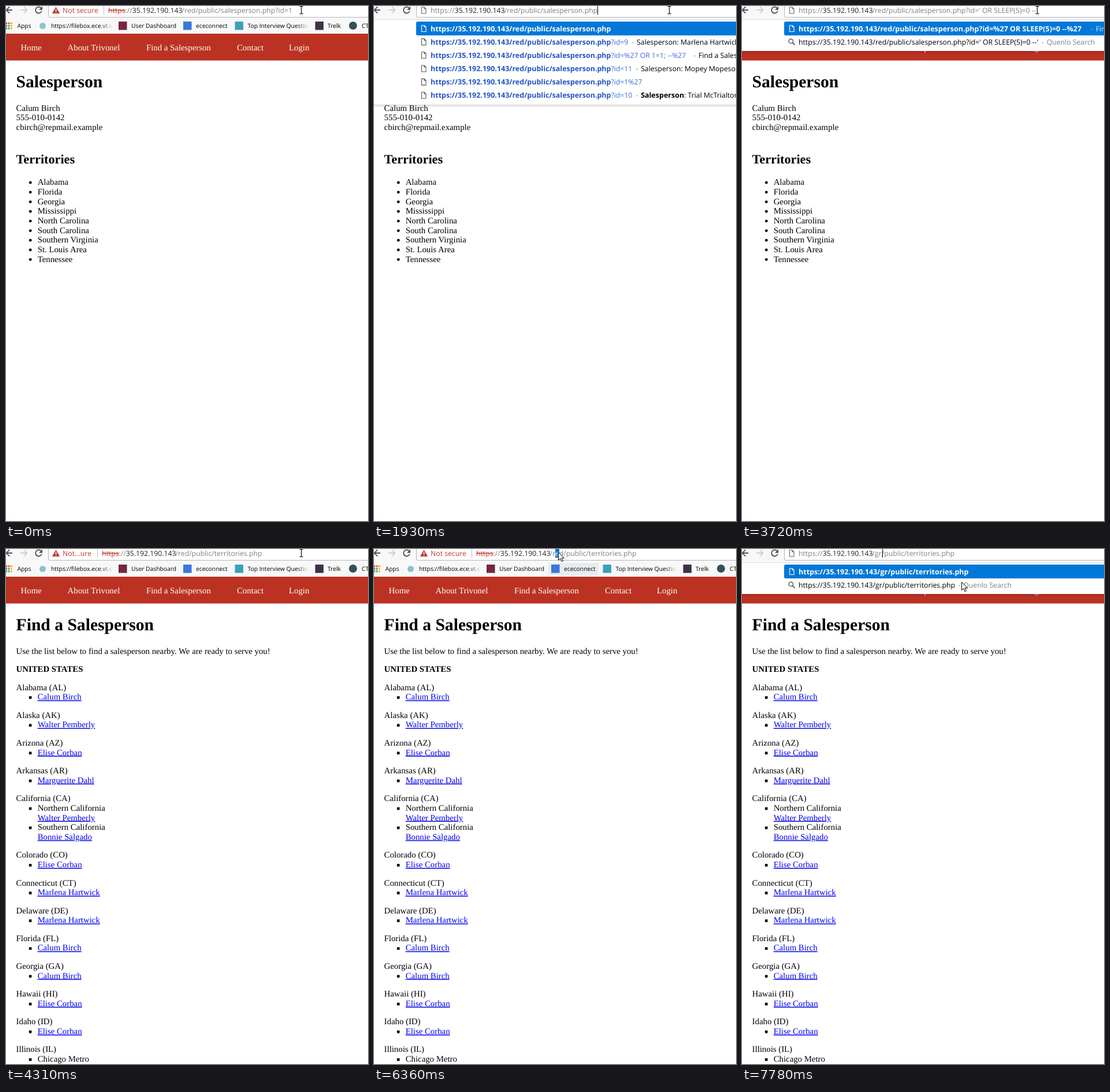
Animation of 627x893 px, one loop 8000 ms. Source, as an HTML page:

```html
<!DOCTYPE html>
<html lang="en">
<head>
<meta charset="utf-8">
<title>Browser session</title>
<style>
html, body { margin: 0; width: 627px; height: 893px; overflow: hidden; background: #fff; }
svg { display: block; }
text { white-space: pre; text-rendering: geometricPrecision; }
.page { font: 14.8px "Liberation Serif", serif; }
.ui { font: 12.25px "Open Sans", "Noto Sans", sans-serif; }
.mark { font: 10.3px "Open Sans", "Noto Sans", sans-serif; }
.b { font-weight: 700; font-size: 12.5px; }
.strong { font-weight: 700; }
.link { fill: #00e; text-decoration: underline; }
</style>
</head>
<body>
<svg id="stage" width="627" height="893" viewBox="0 0 627 893"></svg>
<script>
const stage = document.getElementById('stage');
const LOOP = 8000, LINE = 16.67, GAP = 31.48;
const BAR = '#f8f8f8', RED = '#bb3223', BLUE = '#0078d7', GREY = '#808080';
const HOST = '35.192.190.143';
const SALES = '/red/public/salesperson.php';
const SLEEP = "?id=' OR SLEEP(5)=0 --'";

const text = (x, y, s, cls = 'page', extra = '') =>
  `<text x="${x}" y="${y}" class="${cls}" ${extra}>${s}</text>`;
const rect = (x, y, w, h, fill, extra = '') =>
  `<rect x="${x}" y="${y}" width="${w}" height="${h}" fill="${fill}" ${extra}/>`;
const path = (d, stroke, w = 1, fill = 'none') =>
  `<path d="${d}" stroke="${stroke}" stroke-width="${w}" fill="${fill}"/>`;
const span = (s, fill, extra = '') => `<tspan fill="${fill}" ${extra}>${s}</tspan>`;
const heading = (y, s, size) => text(17.6, y, s, 'page strong', `style="font-size:${size}px"`);

const defs = `<defs>
  <linearGradient id="fade"><stop stop-color="${BAR}" stop-opacity="0"/><stop offset="1" stop-color="${BAR}"/></linearGradient>
  <linearGradient id="shade" x2="0" y2="1"><stop stop-opacity=".16"/><stop offset="1" stop-opacity="0"/></linearGradient>
</defs>`;

// Page content
const REP = { a: 'Calum Birch', b: 'Walter Pemberly', c: 'Elise Corban', d: 'Marguerite Dahl', e: 'Bonnie Salgado', f: 'Marlena Hartwick' };
const AREAS = ['Alabama', 'Florida', 'Georgia', 'Mississippi', 'North Carolina', 'South Carolina',
  'Southern Virginia', 'St. Louis Area', 'Tennessee'];
const STATES = [['Alabama (AL)', 'a'], ['Alaska (AK)', 'b'], ['Arizona (AZ)', 'c'], ['Arkansas (AR)', 'd'],
  ['California (CA)', '*Northern California', 'b', '*Southern California', 'e'],
  ['Colorado (CO)', 'c'], ['Connecticut (CT)', 'f'], ['Delaware (DE)', 'f'], ['Florida (FL)', 'a'],
  ['Georgia (GA)', 'a'], ['Hawaii (HI)', 'c'], ['Idaho (ID)', 'c'], ['Illinois (IL)', '*Chicago Metro']];

function salesPage() {
  const info = [REP.a, '555-010-0142', 'cbirch@repmail.example'];
  return heading(141, 'Salesperson', 29.6) +
    info.map((s, i) => text(17.6, 181.7 + i * LINE, s)).join('') +
    heading(273.4, 'Territories', 22.2) +
    AREAS.map((s, i) => {
      const y = 310.2 + i * LINE;
      return `<circle cx="42.2" cy="${y - 4}" r="2.4"/>` + text(54.7, y, s);
    }).join('');
}

function listPage() {
  let out = heading(141, 'Find a Salesperson', 29.6) +
    text(17.6, 181.7, 'Use the list below to find a salesperson nearby. We are ready to serve you!') +
    heading(213.1, 'UNITED STATES', 14.8);
  let y = 244.6;
  for (const [name, ...items] of STATES) {
    out += text(17.6, y, name);
    items.forEach((it, i) => {
      y += LINE;
      const plain = it[0] === '*';
      if (plain || i === 0) out += rect(39.8, y - 6, 4.6, 4.6, '#000');
      out += plain ? text(54.7, y, it.slice(1)) : text(54.7, y, REP[it], 'page link');
    });
    y += GAP;
  }
  return out;
}

const NAV = rect(0, 48, 627, 46.5, RED) +
  [[25.6, 'Home'], [106.6, 'About Trivonel'], [243, 'Find a Salesperson'], [400, 'Contact'], [490, 'Login']]
    .map(([x, s]) => text(x, 77, s, 'page', 'fill="#fff"')).join('');

// Browser chrome
function bookmarks(hover) {
  const dots = ['#ea4335', '#ea4335', '#f4a024', '#34a853', '#4285f4', '#fbbc05', '#34a853', '#34a853', '#fbbc05']
    .map((c, i) => rect(-1 + i % 3 * 4.4, 28.5 + Math.floor(i / 3) * 4.4, 3, 3, c)).join('');
  const icons = [[195, '#742545'], [307, '#3b78d8'], [396.5, '#3da0bb'], [535.5, '#40304a']]
    .map(([x, c]) => rect(x, 27, 14.5, 14.5, c)).join('');
  const labels = [[19.5, 'Apps'], [78, 'https://filebox.ece.vt.e'], [217, 'User Dashboard'], [329, 'ececonnect'],
    [418.5, 'Top Interview Questio'], [557, 'Trelk'], [616, 'CT']]
    .map(([x, s]) => text(x, 38, s, 'mark')).join('');
  return rect(0, 22, 627, 26, BAR) + (hover ? rect(302, 22.5, 87, 23, '#e9ebf0', 'rx="2"') : '') +
    dots + icons + '<circle cx="63.5" cy="34.5" r="5.5" fill="#8cc3cc"/><circle cx="601" cy="34" r="7" fill="#35505c"/>' +
    labels + rect(164, 25, 21, 20, 'url(#fade)') + rect(504, 25, 21, 20, 'url(#fade)') + rect(185, 25, 8, 20, BAR);
}

const fileIcon = (y, c) => path(`M82.5 ${y - 5.5}h4.5l3 3v8h-7.5zM87 ${y - 5.5}v3h3`, c, 1.1);
const lensIcon = y => `<circle cx="84.8" cy="${y - 1.2}" r="3.7" fill="none" stroke="#555" stroke-width="1.4"/>` +
  path(`M87.5 ${y + 1.5}l4 4`, '#555', 1.8);

const TOOLS = rect(0, 0, 627, 24, BAR) +
  path('M11 7H1M6 1.5L.5 7L6 12.5', '#555', 1.8) +
  path('M25 7H36M31 1.5L36.5 7L31 12.5', '#cfcfcf', 1.8) +
  path('M61 3.9A5.4 5.4 0 1 0 61.7 8.7', '#505050', 1.9) +
  '<path d="M63 .8v6h-6z" fill="#505050"/>' +
  rect(73.5, -8, 570, 27.5, '#fff', 'rx="2.5" stroke="#b4b4b4"');

const WARNING = '<path d="M86.5 1.5L93.2 13H79.8z" fill="#c5392a"/>' + rect(85.8, 5.2, 1.5, 4, '#fff') + rect(85.8, 10.2, 1.5, 1.4, '#fff');

function omnibox(s) {
  let out = '', x = 98;
  if (s.chip) {
    x = s.chip === 'short' ? 166 : 177;
    out += WARNING + text(98, 12, s.chip === 'short' ? 'Not...ure' : 'Not secure', 'ui', 'fill="#c5392a"') +
      rect(x - 8, 0, 1, 15, '#bbb') +
      text(x, 12, span('https', '#c5392a', 'text-decoration="line-through"') + span('://', GREY), 'ui');
  } else {
    out += fileIcon(7.5, '#666') + text(x, 12, 'https://', 'ui', `fill="${GREY}"`);
  }
  out += text(x + 41.8, 12, HOST, 'ui', 'fill="#222"');
  let tail = s.tail;
  if (s.sel) {
    const [a, b, left, w] = s.sel;
    out += rect(left, 0, w, 15, BLUE);
    tail = tail.slice(0, a) + span(tail.slice(a, b), '#fff') + tail.slice(b);
  }
  out += text(x + 127.6, 12, tail, 'ui', `fill="${GREY}"`);
  return out + (s.caret ? rect(s.caret, 0, 1, 15, '#000') : '');
}

// Suggestions
const HITS = [['?id=9', 'Salesperson: Marlena Hartwick'], ['?id=%27 OR 1=1; --%27', 'Find a Salesperson', 13],
  ['?id=11', 'Salesperson: Mopey Mopeson (Fake)'], ['?id=1%27'],
  ['?id=10', '<tspan class="b">Salesperson</tspan>: Trial McTrialton']];
const rowY = i => 39 + i * 23.15;
const note = (s, dash, fill, gap = 6) => span('-', dash, `dx="${gap}"`) + span(s, fill, 'dx="4.8"');

function topRow(tail, extra = '') {
  return rect(73, 27, 560, 24, BLUE, 'rx="2.5"') + fileIcon(39, '#fff') +
    text(98, 43.5, `<tspan class="b">https://${HOST}${tail}</tspan>${extra}`, 'ui', 'fill="#fff"');
}

function historyRows(tail) {
  const typed = tail.slice(SALES.length);
  return topRow(tail) + HITS.map(([q, name, gap], i) => {
    let n = 0;
    while (n < typed.length && q[n] === typed[n]) n++;
    const y = rowY(i + 1);
    return fileIcon(y, '#555') + text(98, y + 4.5,
      span(`https://${HOST}${SALES}${q.slice(0, n)}`, '#2453c2', 'class="b"') + span(q.slice(n), '#3d6cd4') +
      (name ? note(name, GREY, '#000', gap) : ''), 'ui');
  }).join('');
}

function searchRows(tail) {
  const sleep = tail.includes('SLEEP');
  const y = rowY(1);
  return topRow(tail.replace(/'/g, '%27'), sleep ? note('Find a Salesperson', '#bcdcf6', '#d3e8fa', 16) : '') +
    lensIcon(y) + text(98, y + 4.5, `https://${HOST}${tail}` + note('Quenlo Search', GREY, GREY, 5.5), 'ui');
}

function dropdown(s) {
  const h = s.open === 'history' ? 171 : 78;
  return rect(0, 23, 627, h - 23, '#fff') + rect(0, 23, 627, 1, '#ddd') + rect(0, h, 627, 5, 'url(#shade)') +
    (s.open === 'history' ? historyRows(s.tail) : searchRows(s.tail)) +
    (s.stale ? rect(0, 78, 627, 18, '#fff') : '');
}

function pointer([kind, x, y]) {
  if (kind === 'beam') return path(`M${x - 3} .5h2.2l.8 1l.8 -1h2.2M${x} 1v12M${x - 3} 13.5h2.2l.8 -1l.8 1h2.2`, '#000', 1.1);
  return path(`M${x + .5} ${y + .5}v14l3.3 -3.1l2.4 5.4l2.2 -1l-2.4 -5.1h4.4z`, '#000', 1, '#fff');
}

// Each step changes some fields of the one before
const beam = ['beam', 511.5];
const STEPS = [
  [0, { page: 'sales', chip: 'full', tail: SALES + '?id=1', mouse: beam, open: '', caret: 0 }],
  [310, { chip: '', tail: SALES + '?id=', open: 'history', caret: 412 }],
  [460, { tail: SALES + '?id', caret: 404 }],
  [980, { caret: 0 }],
  [1530, { tail: SALES + '?i', caret: 396 }],
  [1680, { tail: SALES + '?', caret: 393 }],
  [1930, { tail: SALES, caret: 387 }],
  [2180, { tail: SALES + SLEEP, open: 'search', stale: true, caret: 521 }],
  [2330, { stale: false }],
  [2600, { caret: 0 }],
  [3200, { caret: 521 }],
  [3720, { caret: 0 }],
  [3870, { open: '', tail: SALES + '?id=%27%20OR%20SLEEP(5)=0%20--%27' }],
  [4310, { page: 'list', chip: 'short', tail: '/red/public/territories.php' }],
  [4460, { chip: 'full' }],
  [5520, { mouse: ['arrow', 462, 17] }],
  [5650, { mouse: ['arrow', 395, 27] }],
  [5800, { mouse: ['arrow', 356, 27], hover: true }],
  [5930, { mouse: ['arrow', 331, -2] }],
  [6080, { mouse: ['beam', 321.5] }],
  [6230, { mouse: ['arrow', 319, 5] }],
  [6360, { sel: [2, 3, 314, 7] }],
  [6500, { sel: [1, 4, 309, 19.5] }],
  [6790, { mouse: null }],
  [6930, { sel: null, hover: false, chip: '', tail: '/g/public/territories.php', open: 'search', caret: 238 }],
  [7640, { caret: 0 }],
  [7780, { tail: '/gr/public/territories.php', caret: 243, mouse: ['arrow', 380, 57] }]
];

let shown = -1;
function draw(t) {
  let n = 0;
  while (n + 1 < STEPS.length && STEPS[n + 1][0] <= t) n++;
  if (n === shown) return;
  shown = n;
  const s = Object.assign({}, ...STEPS.slice(0, n + 1).map(step => step[1]));
  stage.innerHTML = defs + rect(0, 0, 627, 893, '#fff') + (s.page === 'sales' ? salesPage() : listPage()) + NAV +
    (s.open ? '' : bookmarks(s.hover)) + TOOLS + (s.open ? dropdown(s) : '') +
    omnibox(s) + (s.mouse ? pointer(s.mouse) : '');
}

const start = performance.now();
function tick() {
  draw((performance.now() - start) % LOOP);
  requestAnimationFrame(tick);
}
tick();
</script>
</body>
</html>
```
